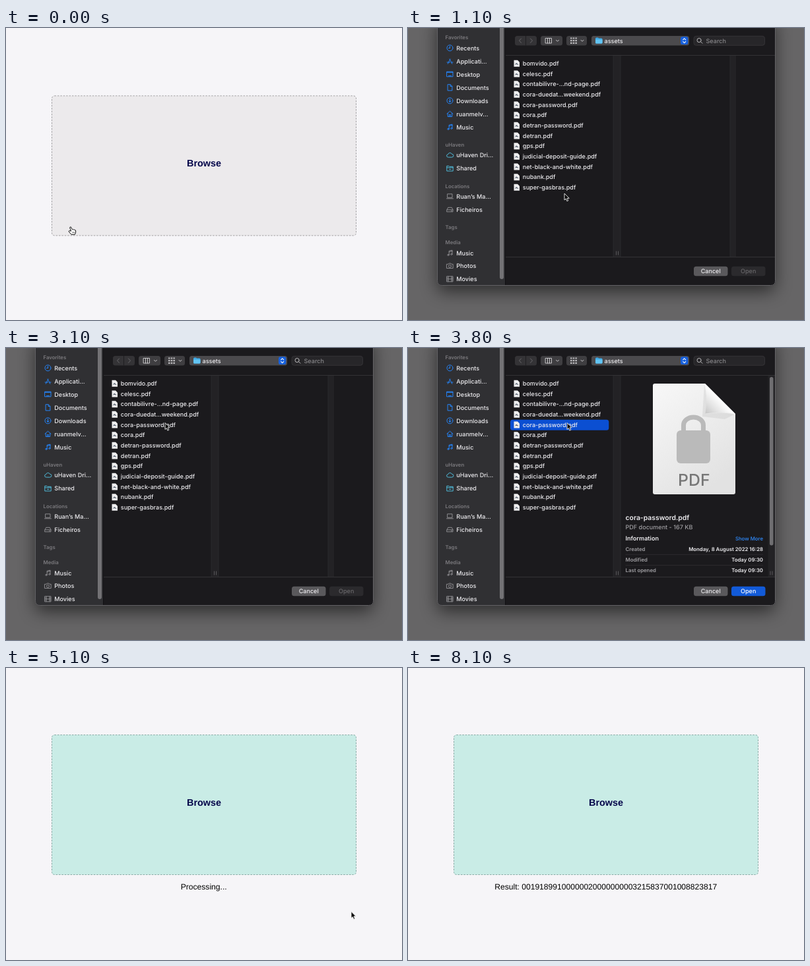
These frames come from a looping animation (600x443 px, 8800 ms). An HTML page:

```html
<!DOCTYPE html>
<html lang="en">
<head>
<meta charset="utf-8">
<title>File picker</title>
<style>
  html, body { margin: 0; width: 100%; height: 100%; overflow: hidden; background: #f6f5f8; }
  svg { display: block; width: 600px; height: 443px; }
  text { white-space: pre; text-rendering: geometricPrecision; }
  .page { font-family: "Liberation Sans", Arial, sans-serif; text-anchor: middle; }
  .ui { font: 500 9.05px Inter, sans-serif; fill: #eeedf0; }
  .head { font-size: 7.8px; font-weight: 600; fill: #7b7a7e; }
  .small { font-size: 7.8px; font-weight: 600; }
  .dim { fill: #a09fa3; }
  .end { text-anchor: end; }
  .mid { text-anchor: middle; }
  .line { fill: none; stroke-linecap: round; stroke-linejoin: round; }
</style>
</head>
<body>
<svg viewBox="0 0 600 443">
  <defs>
    <clipPath id="frame"><rect x="44" y="-20" width="513" height="411" rx="7"/></clipPath>
    <filter id="blur" x="-20%" y="-20%" width="140%" height="140%"><feGaussianBlur stdDeviation="13"/></filter>
    <linearGradient id="paper" x1="0" y1="0" x2=".6" y2="1">
      <stop offset="0" stop-color="#f8f8f8"/><stop offset="1" stop-color="#e2e2e2"/>
    </linearGradient>
    <linearGradient id="fold" x1="0" y1="1" x2="1" y2="0">
      <stop offset="0" stop-color="#c4c4c4"/><stop offset=".25" stop-color="#e4e4e4"/><stop offset=".5" stop-color="#fff"/>
    </linearGradient>
  </defs>

  <g id="page" class="page">
    <g id="drop">
      <rect id="zone" x="69.5" y="101.5" width="461" height="212" rx="4" stroke-dasharray="2.6 1.8"/>
      <text x="300" y="208.7" font-size="14.4" font-weight="700" fill="#04064a">Browse</text>
    </g>
    <text id="status" x="299.7" y="336.2" font-size="12.1" fill="#000"></text>
  </g>

  <g id="dialog" class="ui">
    <rect width="600" height="443" fill="#666566"/>
    <rect x="44" y="-10" width="512" height="410" rx="9" fill="#000" opacity=".55" filter="url(#blur)"/>
    <g clip-path="url(#frame)">
      <rect x="44" y="-20" width="104" height="411" fill="#303033"/>
      <rect x="147.5" y="-20" width="410" height="411" fill="#1b1a1d"/>
      <path d="M147.5 -20V391" stroke="#111013"/>
      <rect x="139" y="-12" width="6" height="393" rx="3" fill="#737275"/>
      <path d="M148 41.5H557M148 347.5H557" stroke="#333235"/>
    </g>
    <g id="side"></g>

    <g id="toolbar">
      <rect x="162" y="12" width="33" height="14.5" rx="3.5" fill="#343336"/>
      <path d="M178.5 12V26.5" stroke="#1f1e21"/>
      <path class="line" d="M171.5 16L168.5 19.2L171.5 22.4M185.5 16L188.5 19.2L185.5 22.4" stroke="#69686b"/>
      <rect x="201" y="12" width="33" height="14.5" rx="3.5" fill="#3f3e41"/>
      <path class="line" d="M208.5 15.5h9v7.5h-9zM211.5 15.5v7.5M214.5 15.5v7.5M224.5 18.3l2 2l2 -2" stroke="#d5d4d6" stroke-width=".9"/>
      <rect x="240" y="12" width="31" height="14.5" rx="3.5" fill="#3f3e41"/>
      <path d="M246 15.5h10M246 19.2h10M246 22.9h10" stroke="#bbbabd" stroke-width="2.2" stroke-dasharray="2.5 1.2"/>
      <path class="line" d="M262 18.3l2 2l2 -2" stroke="#d5d4d6" stroke-width=".9"/>
      <rect x="278" y="12" width="148" height="14.5" rx="3.5" fill="#4b4a4d"/>
      <path d="M284 16q0 -1.5 1.5 -1.5h2.5l1 1h4q1.5 0 1.5 1.5v5q0 1.5 -1.5 1.5h-7.5q-1.5 0 -1.5 -1.5z" fill="#3fa9e4"/>
      <path d="M284 17.5h10.5v4.5q0 1.5 -1.5 1.5h-7.5q-1.5 0 -1.5 -1.5z" fill="#62c4f3"/>
      <text x="297.5" y="22.5">assets</text>
      <rect x="413" y="13.3" width="11.3" height="11.8" rx="2.8" fill="#1760dc"/>
      <path class="line" d="M416.7 17.8l2 -2l2 2M416.7 20.7l2 2l2 -2" stroke="#fff" stroke-width="1.1"/>
      <rect x="433" y="12.3" width="107.5" height="14" rx="3.5" fill="#272629" stroke="#39383b" stroke-width=".8"/>
      <path class="line" d="M446 23.2l-2.6 -2.6M444.2 18.6a3.1 3.1 0 1 1 -6.2 0a3.1 3.1 0 1 1 6.2 0" stroke="#b9b8ba"/>
      <text x="451.5" y="22.6" fill="#88878a">Search</text>
    </g>

    <g id="empty">
      <path d="M488 42h9v305h-9z" fill="#232225"/>
      <path d="M488 42v305" stroke="#2f2e31" stroke-width=".7"/>
    </g>
    <path d="M311 42h11v305h-11z" fill="#232225"/>
    <path d="M311 42v305M322 42v305" stroke="#2f2e31" stroke-width=".7"/>
    <path d="M315.5 338.5v6M318.5 338.5v6" stroke="#6a696c" stroke-width=".8"/>

    <rect id="pick" x="155" y="108.8" width="149.3" height="16" rx="3.5" fill="#0b4fd2"/>
    <g id="files"></g>

    <g id="preview">
      <path d="M545.5 42h11v305h-11z" fill="#232225"/>
      <rect x="548" y="44" width="5.5" height="255.5" rx="2.7" fill="#6f6e71"/>
      <path d="M549 338.5v6M552 338.5v6" stroke="#6a696c" stroke-width=".8"/>
      <path d="M374 54H450L496 100V219q0 3 -3 3H374q-3 0 -3 -3V57q0 -3 3 -3z" fill="url(#paper)"/>
      <path d="M449 56Q455 76 451 100Q476 96 494 101L480 108L446 104Z" fill="#999" opacity=".18"/>
      <path d="M450 54Q454 76 450.5 99.5Q476 96 496 100z" fill="url(#fold)"/>
      <rect x="407" y="125" width="51" height="50" rx="6" fill="#bababa"/>
      <path d="M417.5 126V117a15 12 0 0 1 30 0V126" fill="none" stroke="#bababa" stroke-width="7"/>
      <text class="mid" x="433.3" y="208.5" font-size="24.8" fill="#777">PDF</text>
      <text x="329.5" y="260.7" font-size="10.4" font-weight="600">cora-password.pdf</text>
      <text class="dim" x="329.5" y="275">PDF document - 167 KB</text>
      <text x="329.5" y="292" font-weight="600">Information</text>
      <text class="end" x="538" y="292" font-size="7.8" fill="#2f8cff">Show More</text>
    </g>

    <rect x="433" y="361.7" width="51.5" height="14.6" rx="3.5" fill="#5a595c"/>
    <text class="mid" x="458.7" y="372.2">Cancel</text>
    <rect id="open" x="490" y="361.7" width="51.5" height="14.6" rx="3.5"/>
    <text id="openText" class="mid" x="515.7" y="372.2">Open</text>
    <path d="M44.5 -5V383.5q0 7 7 7H549.5q7 0 7 -7V-5" fill="none" stroke="#636265"/>
  </g>

  <g id="hand" fill="#fff" stroke="#111" stroke-linejoin="round">
    <path d="M-1.3 1Q-1.2 -.6 .4 -.1L2.3 3.7Q3.4 3 4.4 4Q5.4 3.5 6.1 4.4Q7.6 4.3 7.7 6L7.5 8.8L6.3 11.3H1L-2.9 6.9Q-3 5.3 -1 5.6L.6 6.2Z"/>
    <path d="M2.8 7.3v2M4.3 7.3v2M5.8 7.3v2" stroke-width=".6"/>
  </g>
  <path id="arrow" d="M0 0V10L2.3 8L3.9 11.7L5.7 10.9L4.1 7.3H7.2Z" fill="#080808" stroke="#f4f4f4" stroke-width=".9"/>
</svg>

<script>
const $ = id => document.getElementById(id);
const NS = 'http://www.w3.org/2000/svg';

function add(parent, tag, attrs, text) {
  const el = document.createElementNS(NS, tag);
  for (const k in attrs) el.setAttribute(k, attrs[k]);
  if (text) el.textContent = text;
  parent.appendChild(el);
  return el;
}

const ring = 'M9.5 5a4.5 4.5 0 1 1 -9 0a4.5 4.5 0 1 1 9 0';
const icons = {
  clock: ring + 'M5 2.3V5.2H3',
  apps: 'M1.8 9L5.5 1.8M4.5 1.8L8.3 9M.6 6.7H5M7.5 6.7H9.5',
  desk: 'M.5 1h9v7.5h-9zM.7 2h8.6M3 7.3h4',
  doc: 'M2 .4h3.7l2.7 2.7v6.5h-6.4zM5.6 .6v2.6h2.6',
  down: ring + 'M5 2.5V7M3.2 5.4L5 7.2L6.8 5.4',
  home: 'M.4 5L5 .9L9.6 5M1.8 4.3V9.2H8.2V4.3M4.1 9V6.2H5.9V9',
  music: 'M3.7 8V1.9L8.5 .8V7M3.7 3.3L8.5 2.2M3.7 8a1.2 1 0 1 1 -2.4 0a1.2 1 0 1 1 2.4 0M8.5 7a1.2 1 0 1 1 -2.4 0a1.2 1 0 1 1 2.4 0',
  cloud: 'M2.4 8.3a2.2 2.2 0 0 1 -.2 -4.4a3 3 0 0 1 5.7 -.4a2.4 2.4 0 0 1 .2 4.8z',
  share: 'M.3 8.8V1.5h3l1 1h5.4v6.3zM.3 4h9.4M4 6.5h2.5',
  laptop: 'M1.5 1.5h7v5.5h-7zM0 8.5h10',
  drive: 'M.5 5.5L2.2 2h5.6l1.7 3.5v3h-9zM.5 5.5h9M7 7h1',
  camera: 'M.3 2.5h2.4l.8 -1.2h3l.8 1.2h2.4v6.2h-9.4zM7 5.5a2 2 0 1 1 -4 0a2 2 0 1 1 4 0',
  film: 'M.5 1h9v8h-9zM2.5 1v8M7.5 1v8M2.5 5h5M.5 3.7h2M.5 6.3h2M7.5 3.7h2M7.5 6.3h2'
};

const blue = '#2585fa', cyan = '#4fb9d8', gray = '#8b8a8e';
const groups = [
  ['Favorites', 14, blue, [['clock', 'Recents', 30], ['apps', 'Applicati...', 50], ['desk', 'Desktop', 70],
    ['doc', 'Documents', 90], ['down', 'Downloads', 110], ['home', 'ruanmelv...', 130], ['music', 'Music', 150]]],
  ['uHaven', 177, cyan, [['cloud', 'uHaven Dri...', 192.5], ['share', 'Shared', 212.5]]],
  ['Locations', 239.5, gray, [['laptop', 'Ruan\u2019s Ma...', 255], ['drive', 'Ficheiros', 275]]],
  ['Tags', 302, gray, []],
  ['Media', 324.5, gray, [['music', 'Music', 341], ['camera', 'Photos', 360.5], ['film', 'Movies', 380.5]]]
];
for (const [title, y, color, rows] of groups) {
  add($('side'), 'text', { class: 'head', x: 56.5, y: y + 3 }, title);
  for (const [icon, label, cy] of rows) {
    add($('side'), 'path', { class: 'line', d: icons[icon], stroke: color, transform: `translate(58.5 ${cy - 4.7})` });
    add($('side'), 'text', { x: 73.3, y: cy + 3.6 }, label);
  }
}

const files = ['bomvido', 'celesc', 'contabilivre-...nd-page', 'cora-duedat...weekend', 'cora-password', 'cora',
  'detran-password', 'detran', 'gps', 'judicial-deposit-guide', 'net-black-and-white', 'nubank', 'super-gasbras'];
files.forEach((name, i) => {
  const row = add($('files'), 'g', { transform: `translate(0 ${53.8 + i * 15.67})` });
  add(row, 'path', { d: 'M160.5 -5h5.5l3 3v7h-8.5z', fill: '#eeeeef' });
  add(row, 'path', { class: 'line', d: 'M163 1.5l1.2 -2l1.2 1.6l1.4 .4M163.3 .8h2.4', stroke: '#56606f' });
  add(row, 'text', { x: 173.8, y: 3.2 }, name + '.pdf');
});

[['Created', 'Monday, 8 August 2022 16:28'], ['Modified', 'Today 09:30'], ['Last opened', 'Today 09:30']].forEach(([key, value], i) => {
  const y = 307.6 + i * 16.4;
  add($('preview'), 'text', { class: 'small dim', x: 329.5, y }, key);
  add($('preview'), 'text', { class: 'small end', x: 538, y }, value);
  if (i < 2) add($('preview'), 'path', { d: `M329.5 ${y + 5.7}H538`, stroke: '#353437', 'stroke-width': .7 });
});

// Pointer tip: time, x, y
const path = [
  [0, 98, 302], [400, 313, 206.5], [700, 236, 253], [1000, 236, 253], [1100, 237, 251],
  [1400, 237, 251], [2300, 239, 230], [3000, 241, 113.5], [3800, 241, 113.5],
  [4600, 523, 370], [5000, 523, 370], [5100, 523, 369.5], [8800, 523, 369.5]
];
function pointer(t) {
  const i = path.findIndex(p => p[0] > t);
  const [a, b] = [path[i - 1], path[i]];
  const u = (t - a[0]) / (b[0] - a[0]);
  const e = u * u * (3 - 2 * u);
  return [a[1] + (b[1] - a[1]) * e, a[2] + (b[2] - a[2]) * e];
}

const show = (id, on) => { $(id).style.display = on ? '' : 'none'; };

function draw(t) {
  const picking = t >= 1100 && t < 5100;
  const picked = t >= 3300;
  const done = t >= 5100;

  show('page', !picking);
  show('dialog', picking);
  show('pick', picked);
  show('preview', picked);
  show('empty', !picked);
  $('open').setAttribute('fill', picked ? '#125ad8' : '#2b2a2d');
  $('openText').setAttribute('fill', picked ? '#fff' : '#68676a');

  $('drop').setAttribute('transform', `translate(0 ${done ? 0 : 1.4})`);
  $('zone').setAttribute('fill', done ? '#c9ece6' : '#eceaec');
  $('zone').setAttribute('stroke', done ? '#87aaa4' : '#a3a2a4');
  $('status').textContent = !done ? '' : t < 5800 ? 'Processing...' :
    'Result: 00191899100000020000000003215837001008823817';

  const at = `translate(${pointer(t)})`;
  const pointing = t < 1100 || (t >= 4600 && t < 5100);
  $('hand').setAttribute('transform', at);
  $('arrow').setAttribute('transform', at);
  show('hand', pointing);
  show('arrow', !pointing && t < 6800);
}

const LOOP = 8800, STEP = 100;
const start = performance.now();
function tick() {
  const t = (performance.now() - start) % LOOP;
  draw(Math.floor(t / STEP) * STEP);
  requestAnimationFrame(tick);
}
tick();
</script>
</body>
</html>
```
